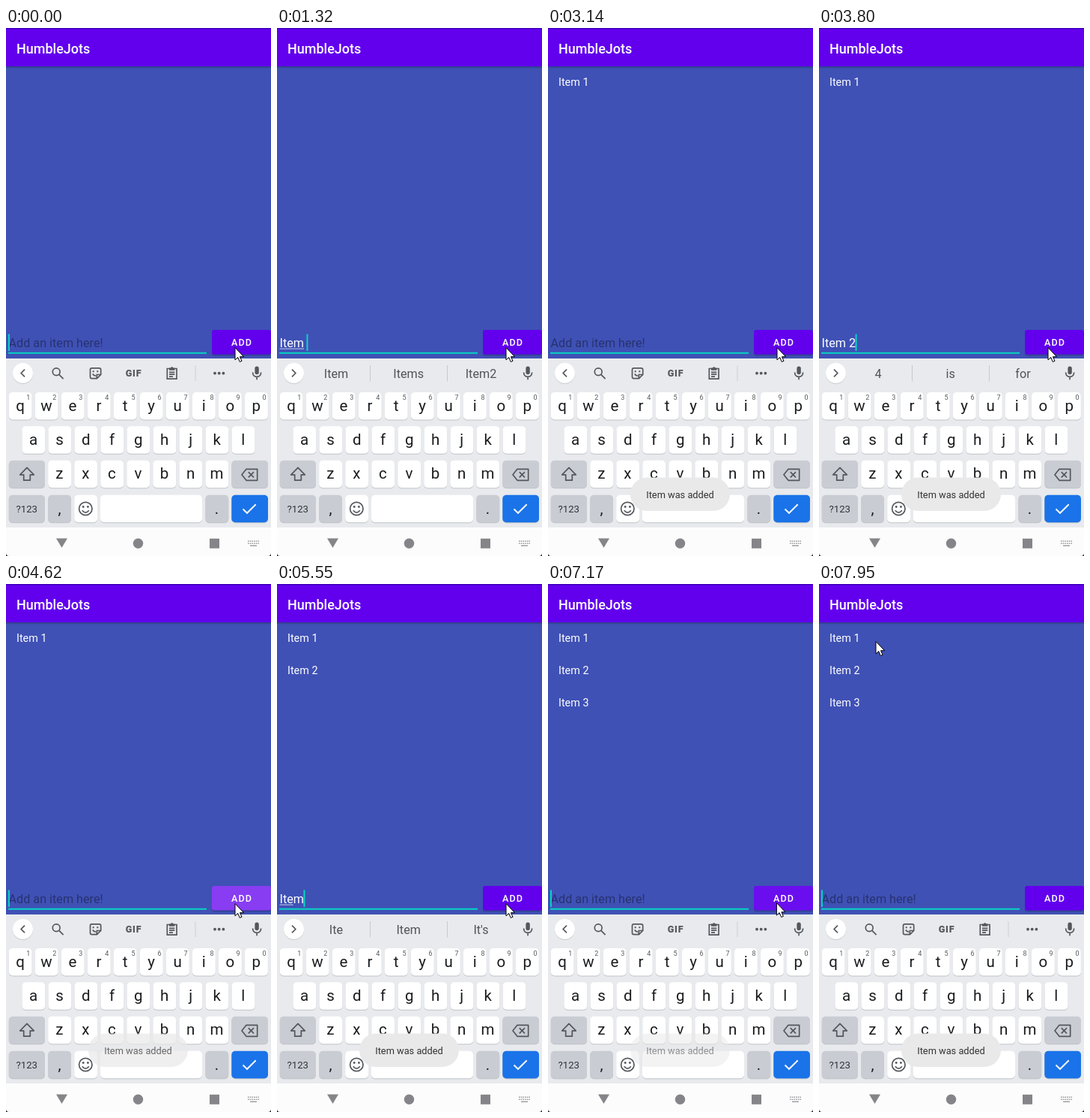
Animation, 354 px wide and 703 px high, one loop 8000 ms. Source, as an HTML page:

```html
<!DOCTYPE html>
<html lang="en">
<head>
<meta charset="utf-8">
<title>Todo list</title>
<style>
  html, body { margin: 0; width: 100%; height: 100%; overflow: hidden; background: #3f51b5; }
  svg { display: block; width: 354px; height: 703px; font-family: Roboto, "Liberation Sans", sans-serif; }
  text { white-space: pre; }
  .mid { text-anchor: middle; }
  .line { fill: none; stroke: #54575b; stroke-width: 1.7; }
  .item { font-size: 14.4px; fill: #fff; }
  .field { font-size: 16.2px; }
  .sugg { font-size: 16.2px; fill: #505357; text-anchor: middle; }
  .key { font-size: 20.5px; fill: #1b1c1e; text-anchor: middle; }
  .num { font-size: 9px; fill: #55585c; text-anchor: middle; }
</style>
</head>
<body>
<svg viewBox="0 0 354 703">
  <defs>
    <linearGradient id="shade" x2="0" y2="1">
      <stop stop-color="#000" stop-opacity=".3"/>
      <stop offset="1" stop-color="#000" stop-opacity="0"/>
    </linearGradient>
    <clipPath id="btn"><rect x="275" y="402" width="79" height="32.5" rx="3"/></clipPath>
  </defs>

  <rect width="354" height="703" fill="#3f51b5"/>
  <rect y="51" width="354" height="3" fill="url(#shade)"/>
  <rect width="354" height="51" fill="#6200ee"/>
  <rect width="354" height="1.3" fill="#3c00b4"/>
  <text x="14" y="34" font-size="18" font-weight="500" fill="#fff">HumbleJots</text>
  <g id="items"></g>

  <text id="hint" class="field" x="3.5" y="425.3" fill="#000" fill-opacity=".38">Add an item here!</text>
  <text id="typed" class="field" x="3.5" y="425.3" fill="#fff"></text>
  <rect id="under" x="3.5" y="426.6" height="1" fill="#fff" opacity=".7"/>
  <rect x="3" y="431.8" width="265" height="1.9" fill="#03dac5"/>
  <rect id="caret" y="407.5" width="1.9" height="22.5" fill="#03dac5"/>

  <rect x="275" y="403.5" width="79" height="33" rx="3" fill="#000" opacity=".18"/>
  <rect x="275" y="402" width="79" height="32.5" rx="3" fill="#6200ee"/>
  <circle id="ripple" cx="309" cy="426" fill="#fff" clip-path="url(#btn)"/>
  <text class="mid" x="315" y="423" font-size="12.6" font-weight="500" letter-spacing="1.1" fill="#fff">ADD</text>

  <rect y="440" width="354" height="225" fill="#e8eaed"/>
  <circle cx="22.5" cy="460.3" r="13.6" fill="#c9ccd0"/>
  <circle cx="22.5" cy="459.5" r="13.5" fill="#fff"/>
  <path id="chevron" class="line" d="M25 454.7L20.2 459.5 25 464.3"/>

  <g id="tools">
    <circle class="line" cx="67.2" cy="457.8" r="4.9"/>
    <path class="line" d="M70.8 461.4L76.6 467.2" stroke-width="2.2"/>
    <path class="line" d="M114.5 452.8H124.5Q126.7 452.8 126.7 455V461.5L121.5 466.7H114.5Q112.5 466.7 112.5 464.5V455Q112.5 452.8 114.5 452.8ZM121.3 466.5V461.5H126.5M115.8 460.5Q117.5 463.5 120 462.7"/>
    <path d="M115.7 456.3h2v2h-2zM121.3 456.3h2v2h-2z" fill="#54575b"/>
    <text class="mid" x="170.5" y="464" font-size="12.6" font-weight="900" letter-spacing=".8" fill="#54575b">GIF</text>
    <path class="line" d="M215.3 453.5H228V467.2H215.3ZM218 458.3H225.3M218 461.2H225.3M218 464.1H223" stroke-width="1.5"/>
    <path d="M218 452.5H220Q221.7 449.5 223.4 452.5H225.4V455.8H218Z" fill="#54575b"/>
    <path d="M253 449.5V470" stroke="#cdd0d4"/>
    <g fill="#54575b"><circle cx="279" cy="459.7" r="1.9"/><circle cx="284.7" cy="459.7" r="1.9"/><circle cx="290.4" cy="459.7" r="1.9"/></g>
  </g>
  <g id="suggs">
    <path d="M124.5 449V470.5M227.5 449V470.5" stroke="#c6c9cd"/>
    <text class="sugg" x="79" y="466"></text>
    <text class="sugg" x="175.7" y="466"></text>
    <text class="sugg" x="272.5" y="466"></text>
  </g>
  <rect x="332.4" y="450.5" width="5.4" height="10.8" rx="2.7" fill="#54575b"/>
  <path class="line" d="M329.6 458.5Q329.6 464.3 335.1 464.3T340.6 458.5M335.1 464.3V468.3"/>

  <g id="keys"></g>
  <path class="line" d="M28 585.3L37.3 594.8H32.3V602.2H23.7V594.8H18.7Z" stroke-width="1.9" stroke-linejoin="round"/>
  <path class="line" d="M321 587.3H335.7V602.3H321L315 594.8ZM323.8 591.2L331 598.4M331 591.2L323.8 598.4" stroke-linejoin="round"/>
  <text class="mid" x="27.8" y="645" font-size="13.2" fill="#303236">?123</text>
  <text class="key" x="71.5" y="647">,</text>
  <text class="key" x="281.5" y="647">.</text>
  <circle class="line" cx="106.3" cy="640" r="8.7"/>
  <path class="line" d="M101.8 642.3Q106.3 648 110.8 642.3" stroke-width="1.5"/>
  <circle cx="103.2" cy="637.5" r="1.4" fill="#54575b"/><circle cx="109.4" cy="637.5" r="1.4" fill="#54575b"/>
  <path d="M316.5 640.5L322 645.8 333.7 634.3" fill="none" stroke="#fff" stroke-width="1.9"/>

  <rect y="665" width="354" height="38" fill="#fcfcfc"/>
  <g fill="#858589">
    <path d="M67 679.5H82L74.5 692Z"/>
    <circle cx="176.5" cy="686.2" r="6.7"/>
    <rect x="272" y="679.8" width="13" height="13"/>
  </g>
  <g fill="none" stroke="#9a9b9e" stroke-width="1.4">
    <path d="M323 683.2H338M323 686.2H338" stroke-dasharray="1.6 1.1"/>
    <path d="M326 689.3H335"/>
  </g>
  <path d="M0 699Q0 703 4 703H0ZM354 699Q354 703 350 703H354Z" fill="#111"/>

  <g id="toast">
    <rect x="110" y="598.5" width="133" height="44.5" rx="22.2" fill="#e9e9ea"/>
    <text class="mid" x="176.5" y="626" font-size="12.8" fill="#333">Item was added</text>
  </g>
  <path id="mouse" d="M0 0V16.5L3.7 13 6.3 19 9 17.8 6.5 12.2H11.6Z" fill="#fff" stroke="#000" stroke-width="1"/>
</svg>
<script>
const $ = id => document.getElementById(id);
const LOOP = 8000;

function add(parent, tag, attrs, text = '') {
  const el = document.createElementNS('http://www.w3.org/2000/svg', tag);
  for (const k in attrs) el.setAttribute(k, attrs[k]);
  el.textContent = text;
  parent.append(el);
  return el;
}

function key(x, y, w, fill = '#fff') {
  const box = { x, y, width: w, height: 36.5, rx: 5 };
  add($('keys'), 'rect', { ...box, y: y + 1, fill: '#bfc3c8' });
  add($('keys'), 'rect', { ...box, fill });
}

[['qwertyuiop', 3.8, 485], ['asdfghjkl', 21.4, 530.3], ['zxcvbnm', 56.2, 575.8]].forEach(([row, x0, y], r) => {
  [...row].forEach((c, i) => {
    const x = x0 + i * 35.03;
    key(x, y, 30.8);
    add($('keys'), 'text', { class: 'key', x: x + 15.2, y: y + 24.6 }, c);
    if (!r) add($('keys'), 'text', { class: 'num', x: x + 26, y: y + 10 }, (i + 1) % 10);
  });
});
const grey = '#c9cdd3';
key(3.8, 575.8, 48.2, grey);
key(301.3, 575.8, 48.7, grey);
key(3.8, 621.8, 48.2, grey);
key(56.2, 621.8, 30.8, grey);
key(91.2, 621.8, 30.8);
key(126, 621.8, 136);
key(266.4, 621.8, 30.8, grey);
key(301.3, 621.8, 48.7, '#1a73e8');

const items = [1, 2, 3].map((n, i) =>
  add($('items'), 'text', { class: 'item', x: 14, y: 77 + i * 43.2 }, 'Item ' + n));

const ticks = [
  0, 250, 810, 930, 1050, 1200, 1320, 1600, 1870,
  2150, 2270, 2390, 2510, 2660, 2780, 2930, 3140, 3290, 3410, 3530, 3680, 3800, 4070,
  4350, 4470, 4590, 4740, 4860, 4980, 5130, 5280, 5400, 5550, 5670, 5910, 6170,
  6450, 6570, 6690, 6810, 7050, 7170, 7290, 7410, 7530, 7650, 7800, 7950
];

// Field states: time, text, underlined letters, suggestions
const nums = '4 is for', word = 'Item Items Item2', part = "Ite Item It's";
const edits = [
  [-250, '', 0],
  [810, 'I', 1, "I I'm It"], [930, 'It', 2, "It It's Its"], [1050, 'Ite', 3, part],
  [1200, 'Item', 4, word], [1320, 'Item ', 4, word], [1600, 'Item 1', 0, nums],
  [2390, '', 0],
  [3290, 'It', 2, "It It's Its"], [3410, 'Ite', 3, part], [3530, 'Item', 4, word],
  [3680, 'Item ', 4, word], [3800, 'Item 2', 0, nums],
  [4590, '', 0],
  [5400, 'It', 2, "It It's Its"], [5550, 'Item', 3, part], [5670, 'Item ', 4, word],
  [5910, 'Item 3', 0, nums],
  [6690, '', 0]
];
const presses = [2150, 4350, 6450];
const toasts = [[2470, 4480], [4870, 6800], [6960, 9000]];

const clamp = v => Math.max(0, Math.min(1, v));
const ctx = document.createElement('canvas').getContext('2d');
function width(s) {
  ctx.font = '16.2px Roboto, "Liberation Sans", sans-serif';
  return ctx.measureText(s).width;
}
const show = (el, on) => el.setAttribute('visibility', on ? 'visible' : 'hidden');

function drawField(t) {
  const [at, text, under, words] = edits.findLast(e => e[0] <= t);
  const typing = words && !(words === nums && t - at >= 260);
  $('typed').textContent = text;
  show($('hint'), !text);
  $('under').setAttribute('width', width(text.slice(0, under)));
  $('caret').setAttribute('x', 3 + width(text));
  show($('caret'), (t - at) % 1000 < 500);
  show($('tools'), !typing);
  show($('suggs'), typing);
  $('chevron').setAttribute('transform', typing ? 'rotate(180 22.5 459.5)' : '');
  if (typing) {
    const list = words.split(' ');
    document.querySelectorAll('.sugg').forEach((el, i) => { el.textContent = list[i]; });
  }
}

function draw(now) {
  const time = now % LOOP;
  const t = ticks.findLast(s => s <= time);
  drawField(t);

  items.forEach((el, i) => el.setAttribute('opacity', clamp((t - presses[i] - 250) / 150)));

  const since = t - (presses.findLast(p => p <= t) ?? -LOOP);
  $('ripple').setAttribute('r', Math.min(90, 20 + since * 0.25));
  $('ripple').setAttribute('opacity', 0.24 * clamp((810 - since) / 400));

  const alpha = toasts.map(([a, b]) => Math.min(clamp((t - a) / 400), clamp((b + 400 - t) / 400)));
  $('toast').setAttribute('opacity', Math.max(...alpha));

  const u = clamp((t - 7150) / 680), p = u * u * (3 - 2 * u);
  $('mouse').setAttribute('transform', `translate(${306 - 230 * p} ${425.5 - 349 * p})`);
}

const start = performance.now();
function loop() {
  draw(performance.now() - start);
  requestAnimationFrame(loop);
}
loop();
</script>
</body>
</html>
```
